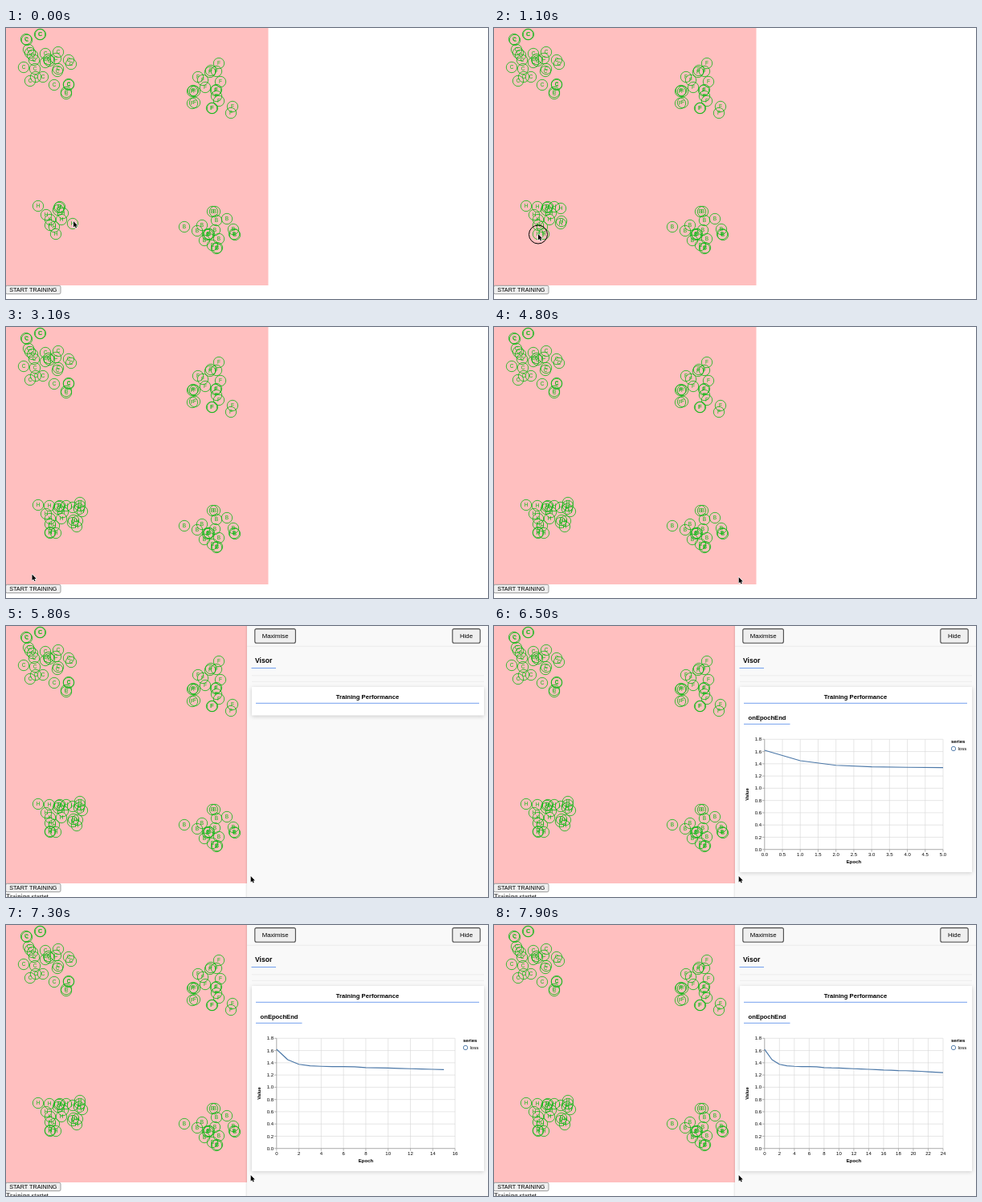
An HTML page with a canvas for the animation above (8 s loop, 600 px wide and 338 px high).

```html
<!DOCTYPE html>
<html lang="en">
<head>
<meta charset="utf-8">
<title>Training demo</title>
<style>
  html, body { margin: 0; width: 100%; height: 100%; overflow: hidden; background: #fff; }
  canvas { display: block; width: 600px; height: 338px; }
</style>
</head>
<body>
<canvas id="stage" width="600" height="338"></canvas>
<script>
const ctx = document.getElementById('stage').getContext('2d');
const LOOP = 8000, STEP = 100;
const VISOR_AT = 5100, CHART_AT = 6100;
const SANS = '"Liberation Sans", Arial, sans-serif';
const SERIF = '"Liberation Serif", Times, serif';
const GREEN = '#0ab814', BLUE = '#6495ed', SERIES = '#4c78a8';

// Sample positions of each label, as x, y pairs.
const C = [25,14, 26,15, 42,8, 43,8, 28,27, 30,31, 33,34, 35,40, 22,49, 36,51, 30,66, 37,61,
  46,61, 49,32, 65,30, 62,38, 53,39, 54,41, 49,43, 65,51, 64,54, 60,71, 78,40, 81,45,
  78,70, 78,71, 75,80, 75,82];
const F = [265,44, 255,53, 254,55, 262,54, 239,61, 245,65, 248,74, 267,67, 262,77, 261,78,
  233,78, 235,79, 232,79, 232,94, 235,93, 265,91, 262,85, 256,100, 257,100, 282,98, 280,106];
const B = [222,248, 257,229, 260,229, 262,240, 275,238, 244,246, 238,253, 247,265, 253,257,
  251,258, 252,257, 260,252, 265,263, 283,251, 284,257, 285,258, 262,275, 263,274, 257,271];
const H = [40,222, 67,223, 66,224, 65,227, 71,231, 50,233, 69,239, 55,239, 55,246, 60,248,
  62,257, 83,244];

// Each click drops one more H sample: time, x, y.
const clicks = [
  [100, 84, 241], [300, 83, 225], [500, 75, 223], [700, 54, 223], [1000, 55, 257],
  [1300, 55, 256], [1600, 88, 249], [1800, 92, 223], [2100, 92, 219], [2300, 91, 227],
  [2500, 89, 242], [2800, 95, 230]
];
const path = [[0, 84, 241]];
for (const [t, x, y] of clicks) path.push([t, x, y], [t + 100, x, y]);
path.push([3100, 32.5, 308.5], [3600, 33, 313], [3900, 36, 326], [4100, 36, 326],
  [4800, 304.7, 312], [LOOP, 304.7, 312]);

const losses = [1.62, 1.45, 1.375, 1.35, 1.342, 1.337, 1.336, 1.335, 1.322, 1.317, 1.315,
  1.308, 1.303, 1.297, 1.293, 1.288, 1.282, 1.279, 1.273, 1.27, 1.266, 1.26, 1.252, 1.245, 1.24];

function text(str, x, y, size, { align = 'left', bold = false, color = '#000', family = SANS } = {}) {
  ctx.font = `${bold ? 'bold ' : ''}${size}px ${family}`;
  ctx.textAlign = align;
  ctx.fillStyle = color;
  ctx.fillText(str, x, y);
}

function line(x1, y1, x2, y2, color, width = 0.6) {
  ctx.strokeStyle = color;
  ctx.lineWidth = width;
  ctx.beginPath();
  ctx.moveTo(x1, y1);
  ctx.lineTo(x2, y2);
  ctx.stroke();
}

function ring(x, y, r, color, width) {
  ctx.strokeStyle = color;
  ctx.lineWidth = width;
  ctx.beginPath();
  ctx.arc(x, y, r, 0, Math.PI * 2);
  ctx.stroke();
}

function box(x, y, w, h, fill) {
  ctx.fillStyle = fill;
  ctx.fillRect(x, y, w, h);
}

function button(label, x, y, w, h, size, { fill = '#efefef', border = '#767676', width = 0.7, radius = 1.8 } = {}) {
  ctx.beginPath();
  ctx.roundRect(x, y, w, h, radius);
  ctx.fillStyle = fill;
  ctx.fill();
  ctx.strokeStyle = border;
  ctx.lineWidth = width;
  ctx.stroke();
  text(label, x + w / 2, y + h / 2 + size * 0.36, size, { align: 'center' });
}

function sample(label, x, y) {
  ring(x, y, 6.7, GREEN, 0.8);
  text(label, x, y + 2.3, 6.5, { align: 'center', color: GREEN });
}

function samples(label, points) {
  for (let i = 0; i < points.length; i += 2) sample(label, points[i], points[i + 1]);
}

function cursorAt(t) {
  const i = Math.max(1, path.findIndex(key => key[0] >= t));
  const [t0, x0, y0] = path[i - 1], [t1, x1, y1] = path[i];
  const u = (t - t0) / (t1 - t0), e = u * u * (3 - 2 * u);
  return [x0 + (x1 - x0) * e, y0 + (y1 - y0) * e];
}

function drawCursor(x, y) {
  ctx.save();
  ctx.translate(x, y);
  ctx.beginPath();
  [[0, 0], [0, 7.4], [1.7, 5.9], [2.9, 8.6], [4.1, 8.1], [2.9, 5.5], [5.2, 5.4]]
    .forEach(p => ctx.lineTo(...p));
  ctx.closePath();
  ctx.lineJoin = 'round';
  ctx.strokeStyle = '#fff';
  ctx.lineWidth = 1.3;
  ctx.stroke();
  ctx.fillStyle = '#000';
  ctx.fill();
  ctx.restore();
}

function drawBoard(t) {
  box(0, 0, 326.5, 321, '#ffbfbf');
  samples('C', C);
  samples('F', F);
  samples('B', B);
  samples('H', H);
  for (const [at, x, y] of clicks) if (t >= at) sample('H', x, y);
  for (const [at, x, y] of clicks) if (t >= at && t < at + 200) ring(x, y + 0.5, 11.5, '#000', 1);
  const fill = t === 3800 ? '#e5e5e5' : t === 3900 ? '#f5f5f5' : '#efefef';
  button('START TRAINING', -0.4, 321.3, 68.4, 10.4, 7.2, { fill });
}

function card(bottom) {
  ctx.save();
  ctx.shadowColor = 'rgba(0,0,0,0.18)';
  ctx.shadowBlur = 5;
  ctx.shadowOffsetY = 1;
  box(306, 76, 289, bottom - 76, '#fff');
  ctx.restore();
}

function drawVisor(chart) {
  text('Training startet', 0, 339.6, 8.7, { family: SERIF });
  ctx.save();
  ctx.shadowColor = 'rgba(0,0,0,0.2)';
  ctx.shadowBlur = 3;
  box(300, -5, 305, 348, '#f9f9f9');
  ctx.restore();
  line(300, 25.3, 600, 25.3, '#ececec', 1);
  const style = { border: '#4a4a4a', width: 1.1, radius: 2 };
  button('Maximise', 309.8, 3.6, 50.6, 17.6, 7.8, style);
  button('Hide', 555.8, 3.6, 34.4, 17.6, 7.8, style);
  text('Visor', 310, 46, 8.6, { bold: true });
  line(305.5, 52.5, 336, 52.5, BLUE, 0.9);
  line(306, 61.8, 595, 61.8, '#e2e2e2');
  line(306, 69.3, 595, 69.3, '#e2e2e2');
  card(chart ? 307 : 111.5);
  text('Training Performance', 450, 91, 7.65, { align: 'center', bold: true });
  line(311, 96.3, 589, 96.3, BLUE, 0.9);
}

// Round tick step of the 1-2-5 series for about `count` ticks.
function tickStep(span, count) {
  const raw = span / count, base = 10 ** Math.floor(Math.log10(raw)), r = raw / base;
  return base * (r >= Math.sqrt(50) ? 10 : r >= Math.sqrt(10) ? 5 : r >= Math.SQRT2 ? 2 : 1);
}

function drawChart(last) {
  const left = 336.8, right = 559, top = 141.3, bottom = 278.7;
  const step = tickStep(last, 10), ticks = Math.ceil(last / step - 1e-6);
  const px = v => left + (right - left) * v / (ticks * step);
  const py = v => bottom - (bottom - top) * v / 1.8;

  text('onEpochEnd', 316.6, 117, 7.6, { bold: true });
  line(311, 122.3, 368.5, 122.3, BLUE, 0.9);

  for (let i = 0; i <= ticks; i++) {
    const v = i * step, x = px(v);
    line(x, top, x, bottom, '#d6d6d6');
    line(x, bottom, x, bottom + 3, '#888');
    text(step < 1 ? v.toFixed(1) : String(v), x, 287.2, 6, { align: 'center' });
  }
  for (let i = 0; i <= 9; i++) {
    const y = py(i / 5);
    line(left, y, right, y, '#d6d6d6');
    line(left - 3, y, left, y, '#888');
    text((i / 5).toFixed(1), 333, y + 2.1, 6, { align: 'right' });
  }
  line(left, top, left, bottom, '#888');
  line(left, bottom, right, bottom, '#888');

  text('Epoch', 448, 296, 6, { align: 'center', bold: true });
  ctx.save();
  ctx.translate(317.3, 210);
  ctx.rotate(-Math.PI / 2);
  text('Value', 0, 0, 6, { align: 'center', bold: true });
  ctx.restore();
  text('series', 569, 146, 6, { bold: true });
  ring(572, 153, 2.7, SERIES, 0.9);
  text('loss', 577.5, 155, 6);

  ctx.strokeStyle = SERIES;
  ctx.lineWidth = 1.2;
  ctx.lineJoin = 'round';
  ctx.beginPath();
  for (let i = 0; i <= last; i++) ctx.lineTo(px(i), py(losses[i]));
  ctx.stroke();
}

function lastEpoch(t) {
  const k = (t - 6800) / STEP;
  return 8 + (k < 0 ? k : Math.floor(k * 1.5));
}

function draw(t) {
  box(0, 0, 600, 338, '#fff');
  drawBoard(t);
  if (t >= VISOR_AT) drawVisor(t >= CHART_AT);
  if (t >= CHART_AT) drawChart(lastEpoch(t));
  drawCursor(...cursorAt(t));
}

let start = null;
function frame(now) {
  start ??= now;
  draw(Math.floor(((now - start) % LOOP) / STEP) * STEP);
  requestAnimationFrame(frame);
}
draw(0);
requestAnimationFrame(frame);
</script>
</body>
</html>
```
